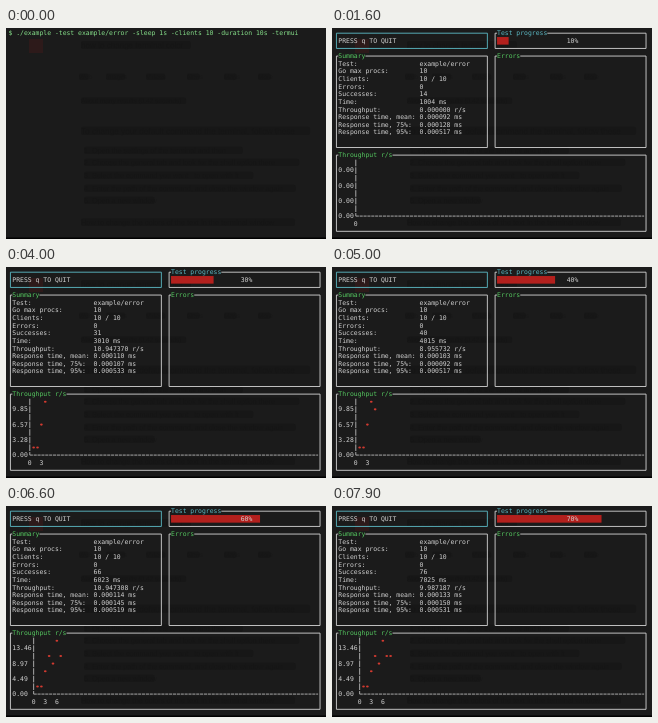
Recreate the animation shown at these times as an HTML page. Size 320 by 211 pixels, loop 8000 ms.

```html
<!DOCTYPE html>
<html lang="en">
<head>
<meta charset="utf-8">
<title>Load test dashboard</title>
<style>
html, body { margin: 0; width: 100%; height: 100%; overflow: hidden; background: #1b1b1b; }
svg { display: block; width: 100%; height: 100%; }
text { white-space: pre; text-rendering: geometricPrecision; }
.term { font: 6.43px "DejaVu Sans Mono", monospace; }
.page { font-family: "Liberation Sans", Arial, sans-serif; fill: #0a0a0a; }
</style>
</head>
<body>
<svg viewBox="0 0 320 211" preserveAspectRatio="none">
  <rect id="bg" width="320" height="211" fill="#1b1b1b"/>
  <g id="page"></g>
  <rect y="209.5" width="320" height="1.5" fill="#000"/>
  <g id="term" class="term"></g>
</svg>
<script>
const LOOP = 8000;
const CELL = 3.87, LINE = 7.62, X0 = 2.5, Y0 = 5.2;
const WHITE = '#d2d2d2', GREEN = '#55c860', CYAN = '#5cb9c4', RED = '#b3201d';
const $ = id => document.getElementById(id);

// Terminal grid: left edge and centre of a column, centre of a row
const left = c => X0 + c * CELL;
const midX = c => left(c + 0.5);
const midY = r => Y0 + r * LINE;

const text = (c, r, s, fill = WHITE) =>
  `<text x="${left(c)}" y="${midY(r) + 2.1}" fill="${fill}">${s}</text>`;
const path = (d, color, extra = '') =>
  `<path d="${d}" fill="none" stroke="${color}" stroke-width=".9" ${extra}/>`;

function box(c1, r1, c2, r2, title = '', color = WHITE, titleColor = GREEN) {
  const [x1, y1, x2, y2] = [midX(c1), midY(r1), midX(c2), midY(r2)];
  const gap = title ? `H${left(c1 + 1)}M${left(c1 + 1 + title.length)} ${y1}` : '';
  return path(`M${x1} ${y1}${gap}H${x2}V${y2}H${x1}V${y1}`, color) +
    text(c1 + 1, r1, title, titleColor);
}

// Per second: time, successes, throughput, mean, 75%, 95% (microseconds)
const STATS = [
  [1004, 14, 0, 92, 128, 517],
  [2007, 20, 5.982156, 101, 104, 525],
  [3010, 31, 10.94737, 110, 107, 533],
  [4015, 40, 8.955732, 103, 92, 517],
  [5019, 55, 14.952153, 109, 119, 518],
  [6023, 66, 10.947308, 114, 145, 519],
  [7025, 76, 9.987187, 133, 150, 531]
];

function summary(n) {
  const [time, done, rate, ...resp] = STATS[n - 1];
  const ms = resp.map(v => (v / 1e6).toFixed(6) + ' ms');
  return [
    ['Test:', 'example/error'],
    ['Go max procs:', '10'],
    ['Clients:', '10 / 10'],
    ['Errors:', '0'],
    ['Successes:', done],
    ['Time:', time + ' ms'],
    ['Throughput:', rate.toFixed(6) + ' r/s'],
    ['Response time, mean:', ms[0]],
    ['Response time, 75%:', ms[1]],
    ['Response time, 95%:', ms[2]]
  ].map(([k, v], i) => text(1, 4 + i, k.padEnd(21) + v)).join('');
}

function gauge(n) {
  const cells = Math.floor(38 * n / 10 + 0.5) - (n === 1 ? 1 : 0);
  return `<rect x="${left(42)}" y="${midY(1) - 3.8}" width="${cells * CELL}" height="${LINE}" fill="${RED}"/>` +
    text(60, 1, n * 10 + '%');
}

function chart(n) {
  const rates = [0, ...STATS.slice(0, n).map(s => s[2])];
  const unit = Math.max(...rates) * 0.15;
  const labels = [0, 2, 4, 6].map(k => (k * unit).toFixed(2));
  const axis = 1 + Math.max(...labels.map(s => s.length));
  const x = midX(axis), base = midY(24);
  let out = labels.map((s, i) => text(1, 24 - 2 * i, s)).join('');
  out += path(`M${x} ${midY(16.6)}V${base}`, '#b8b8b8', 'stroke-dasharray="6.6 1.02"');
  out += path(`M${x} ${base}H${left(80)}`, '#b8b8b8', 'stroke-dasharray="3.1 .77"');
  for (let s = 0; s <= n; s += 3) out += text(axis + s, 25, s);
  if (unit) rates.forEach((v, i) => {
    const row = 23 - Math.floor(v / unit);
    out += `<ellipse cx="${midX(axis + 1 + i)}" cy="${midY(row)}" rx="1.35" ry="1.05" fill="#d23a30"/>`;
  });
  return out;
}

const dashboard = n =>
  box(0, 0, 39, 2, '', CYAN) + text(1, 1, 'PRESS q TO QUIT') +
  box(41, 0, 80, 2, 'Test progress', WHITE, CYAN) + gauge(n) +
  box(0, 3, 39, 15, 'Summary') + summary(n) +
  box(41, 3, 80, 15, 'Errors') +
  box(0, 16, 80, 26, 'Throughput r/s') + chart(n);

const COMMAND = text(0, 0, '$ ./example -test example/error -sleep 1s -clients 10 -duration 10s -termui', '#86e08a');

// Page faintly visible through the terminal: x, y, size, words
const PAGE = [
  [75, 20, 8, 'how to change terminal color'],
  [73, 51, 6.5, 'Web'], [100, 51, 6.5, 'Images'], [140, 51, 6.5, 'Videos'],
  [181, 51, 6.5, 'News'], [218, 51, 6.5, 'Maps'], [252, 51, 6.5, 'More'],
  [75, 75, 6.5, 'About many results (0.42 seconds)'],
  [75, 106, 8.2, 'To change your default command the terminal, follow these'],
  [78, 125, 7.2, '1. Open the settings of the terminal and then'],
  [78, 137, 7.2, '2. Choose the general tab and look for the shell option there'],
  [78, 150, 7.2, '3. Select the command you want   to open with it'],
  [78, 163, 7.2, '4. Enter the path of the command, and close the window again'],
  [78, 175, 7.2, '5. Open a new window'],
  [75, 197, 7.4, 'How to change the colors of the text in the terminal window']
];
const bands = PAGE.map(([x, y, size, s]) =>
  `<rect x="${x}" y="${y - size + 1}" width="${Math.min(320 - x, s.length * size * 0.49)}" height="${size}" rx="2" fill="#111" opacity=".45"/>`).join('');
$('page').innerHTML = '<rect x="23" y="11" width="14" height="14" fill="#331a1a"/>' + bands +
  '<g id="words" class="page">' + PAGE.map(([x, y, size, s]) =>
    `<text x="${x}" y="${y}" font-size="${size}">${s}</text>`).join('') + '</g>';

let shown = '';
function draw(t) {
  const n = t < 1600 ? 0 : Math.min(7, 1 + Math.floor((t - 1600) / 1000));
  const echo = t < 100 ? 1 : t < 200 ? 0.15 : t < 500 ? 0.06 : 0;
  const key = n + ':' + echo;
  if (key === shown) return;
  shown = key;
  const blank = !n && echo < 1;
  $('bg').setAttribute('fill', blank ? '#181818' : '#1b1b1b');
  $('words').setAttribute('opacity', blank ? 0.7 : 0.2);
  $('page').setAttribute('opacity', blank ? 1 : 0.75);
  $('term').innerHTML = n ? dashboard(n) : `<g opacity="${echo}">${COMMAND}</g>`;
}

const start = performance.now();
function frame() {
  draw((performance.now() - start) % LOOP);
  requestAnimationFrame(frame);
}
frame();
</script>
</body>
</html>
```
